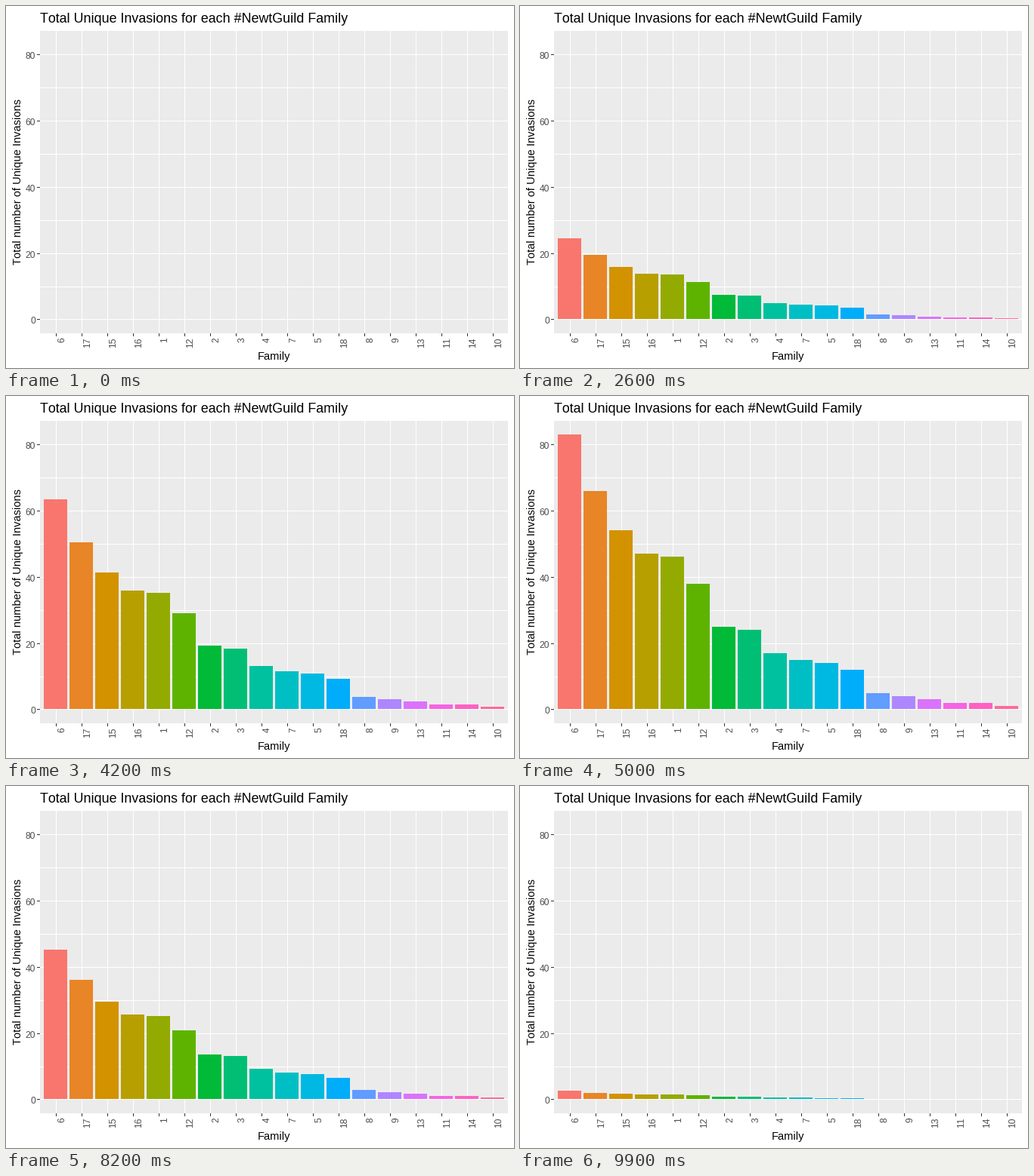
These frames come from a looping animation (672 by 480 pixels, 10 s). A matplotlib script:

```python
import matplotlib.pyplot as plt
from matplotlib.animation import FuncAnimation
from matplotlib.patches import Rectangle

W, H, DPI = 672, 480, 96
FRAMES, INTERVAL = 100, 100

FAMILIES = [6, 17, 15, 16, 1, 12, 2, 3, 4, 7, 5, 18, 8, 9, 13, 11, 14, 10]
TOTALS = [83, 66, 54, 47, 46, 38, 25, 24, 17, 15, 14, 12, 5, 4, 3, 2, 2, 1]
COLORS = ["#F8766D", "#E88526", "#D39200", "#B79F00", "#93AA00", "#5EB300",
          "#00BA38", "#00BF74", "#00C19F", "#00BFC4", "#00B9E3", "#00ADFA",
          "#619CFF", "#AE87FF", "#DB72FB", "#F564E3", "#FF61C3", "#FF699C"]

LEFT, TOP, RIGHT, BOTTOM = 45, 33, 664, 434
X0, X_STEP = 66, 34             # first category centre, spacing
Y0, Y_SCALE = 415.96, 4.392     # zero line, pixels per unit
BAR_HALF = 0.45 * X_STEP

# growth from RISE_FROM to RISE_TO, decline from FALL_FROM to the loop's end
RISE_FROM, RISE_TO, FALL_FROM = 16, 50, 67

plt.rcParams.update({"font.family": "Liberation Sans",
                     "text.kerning_factor": 6})

fig = plt.figure(figsize=(W / DPI, H / DPI), dpi=DPI, facecolor="white")
ax = fig.add_axes([0, 0, 1, 1])
ax.set_xlim(0, W)
ax.set_ylim(H, 0)
ax.axis("off")


def x_pos(i):
    return X0 + i * X_STEP


def y_pos(value):
    return int(Y0 - value * Y_SCALE)


def box(x0, y0, x1, y1, color, z=1):
    return ax.add_patch(Rectangle((x0, y0), x1 - x0, y1 - y0, facecolor=color,
                                  linewidth=0, antialiased=False, zorder=z))


def label(x, y, text, size, color="black", ha="center", angle=0):
    ax.text(x, y, text, fontsize=size, color=color, ha=ha, va="baseline",
            rotation=angle, rotation_mode="anchor")


# panel, grid and axes
box(LEFT, TOP, RIGHT, BOTTOM, "#EBEBEB")
for value in range(0, 81, 10):
    y = y_pos(value)
    box(LEFT, y, RIGHT, y + 1, "white", 2)
    if value % 20 == 0:
        box(LEFT - 4, y, LEFT, y + 1, "#333333", 2)
        label(39, y + 6, str(value), 9, "#4D4D4D", "right")
for i, family in enumerate(FAMILIES):
    x = x_pos(i)
    box(x, TOP, x + 1, BOTTOM, "white", 2)
    box(x, BOTTOM, x + 1, BOTTOM + 4, "#333333", 2)
    label(x + 11, 439.5, str(family), 9, "#4D4D4D", "right", 90)

label(45.3, 22, "Total Unique Invasions for each #NewtGuild Family", 13.4,
      ha="left")
label(355, 469, "Family", 11)
label(20, 233.2, "Total number of Unique Invasions", 11, angle=90)

bars = [box(int(x_pos(i) - BAR_HALF), y_pos(0), int(x_pos(i) + BAR_HALF),
            y_pos(0), color, 3) for i, color in enumerate(COLORS)]


def level(frame):
    rise = (frame - RISE_FROM) / (RISE_TO - RISE_FROM)
    fall = (FRAMES - frame) / (FRAMES - FALL_FROM)
    return max(0, min(1, rise, fall))


def update(frame):
    share = level(frame)
    for bar, total in zip(bars, TOTALS):
        top = y_pos(total * share)
        bar.set_y(top)
        bar.set_height(y_pos(0) - top)
        bar.set_visible(top < y_pos(0))
    return bars


anim = FuncAnimation(fig, update, frames=FRAMES, interval=INTERVAL,
                     repeat=True, repeat_delay=0)
plt.show()
```
